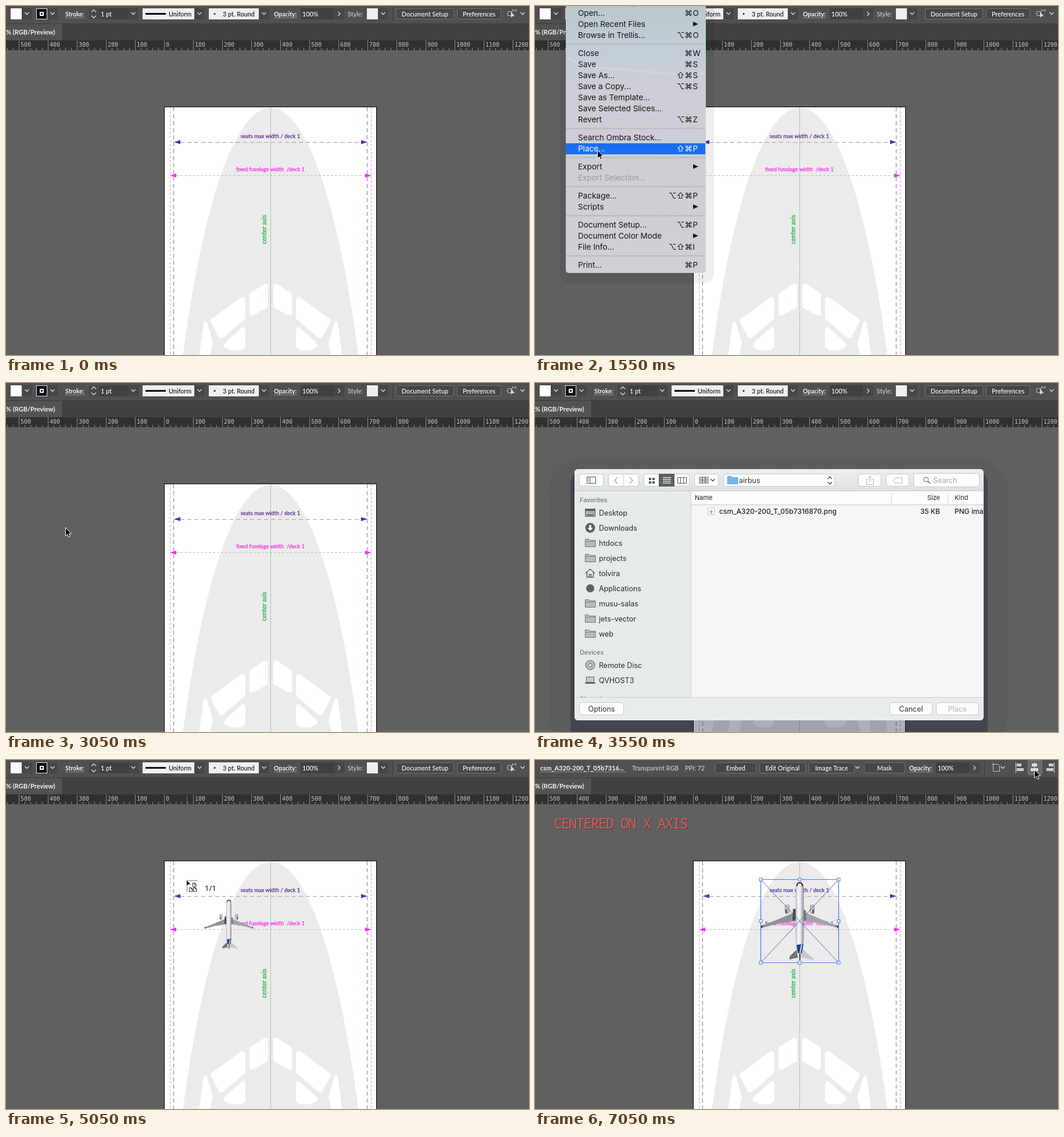
Animation of 900x600 px, one loop 8 s. Source, as an HTML page:

```html
<!DOCTYPE html>
<html lang="en">
<head>
<meta charset="utf-8">
<title>Placing and centering an image</title>
<style>
html, body { margin: 0; width: 100%; height: 100%; overflow: hidden; background: #606060; }
svg { display: block; width: 900px; height: 600px; }
text { white-space: pre; }
.ui { font: 500 10.8px Lato, sans-serif; }
.note { font: 9.4px Lato, sans-serif; text-anchor: middle; stroke-width: .25px; }
.ruler { font: 10px "DejaVu Sans Mono", monospace; fill: #c4c4c4; }
.menu { font: 13.5px Inter, "DejaVu Sans", sans-serif; }
.mac { font: 12.5px Inter, sans-serif; }
.head { font: 500 10.8px Inter, sans-serif; fill: #747678; }
.col { font: 11px Inter, sans-serif; }
.file { font: 500 12px Inter, sans-serif; }
.title { font: 24.5px "Noto Sans Mono", monospace; letter-spacing: -1.95px; fill: #d65b5b; filter: drop-shadow(1px 1px 0 #443c3c); }
</style>
</head>
<body>
<svg id="stage" viewBox="0 0 900 600"></svg>
<script>
const LOOP = 8000;

// ---------- drawing helpers ----------
const rect = (x, y, w, h, fill, extra = '') =>
  `<rect x="${x}" y="${y}" width="${w}" height="${h}" fill="${fill}" ${extra}/>`;
const text = (x, y, str, cls, fill = '', extra = '') =>
  `<text x="${x}" y="${y}" class="${cls}" ${fill && `fill="${fill}"`} ${extra}>${str}</text>`;
const line = (x1, y1, x2, y2, stroke, extra = '') =>
  `<line x1="${x1}" y1="${y1}" x2="${x2}" y2="${y2}" stroke="${stroke}" ${extra}/>`;
const shape = (d, fill, extra = '') => `<path d="${d}" fill="${fill}" ${extra}/>`;
const stroke = (d, color, extra = '') => shape(d, 'none', `stroke="${color}" ${extra}`);
const circle = (x, y, r, fill, extra = '') => `<circle cx="${x}" cy="${y}" r="${r}" fill="${fill}" ${extra}/>`;
const range = (n, fn) => Array.from({ length: n }, (_, i) => fn(i)).join('');
const dash = pattern => `stroke-dasharray="${pattern}"`;
const middle = 'text-anchor="middle"', end = 'text-anchor="end"';
const timed = (from, to, body) => `<g data-from="${from}" data-to="${to}">${body}</g>`;

const chevron = (x, y = 13, color = '#ddd') => stroke(`M${x - 3.5} ${y - 2}l3.5 3.5 3.5-3.5`, color, 'stroke-width="1.3"');
const dropdown = x => rect(x - 8, 4, 17, 19, '#464646') + chevron(x);
const underlined = (x, str, w, size = 10.4) =>
  text(x, 17.5, str, 'ui', '#f4f4f4', `style="font-weight:700;font-size:${size}px"`) +
  line(x, 20.5, x + w, 20.5, '#ccc', dash('1 1'));
const button = (x, w, label) =>
  rect(x + .5, 4.5, w - 1, 18, '#464646', 'rx="2.5" stroke="#707070"') +
  text(x + w / 2, 17.7, label, 'ui', '#fff', middle);
const opacityField = x => underlined(x, 'Opacity:', 40) + rect(x + 46, 4, 58, 19, '#404040') +
  text(x + 49, 17.5, '100%', 'ui', '#fff') + rect(x + 105, 4, 16, 19, '#464646') +
  stroke(`M${x + 110.5} 10l3.5 3.5-3.5 3.5`, '#ddd', 'stroke-width="1.3"');

// ---------- application frame ----------
const note = (x, y, str, color, extra = '') => text(x, y, str, 'note', color, `stroke="${color}" ${extra}`);

function artboard() {
  const panes = 'M422 496L445 481H448V516L425 529H422Z M355 541L407 503L409 505V536L373 567L369 568Z' +
    ' M343 545L353 580L347 604H335Z M378 584L381 579L408 555L409 558V585L404 589H387Z';
  const cockpit = shape(panes, '#fff', 'stroke="#fff" stroke-width="6" stroke-linejoin="round"');
  const arrows = (y, l, r, color) =>
    shape(`M${l} ${y}l11-3.5v7zM${r} ${y}l-11-3.5v7z`, color);
  return rect(272.5, 173.5, 365, 440, '#fff', 'stroke="#000"') +
    '<ellipse cx="455.5" cy="1228" rx="188" ry="1053" fill="#ebebeb"/>' +
    cockpit + `<g transform="matrix(-1 0 0 1 911 0)">${cockpit}</g>` +
    line(455.5, 175, 455.5, 600, '#86bf8c', dash('2 1')) +
    line(282.5, 174, 282.5, 600, '#dda898', dash('4 3')) +
    line(288.5, 174, 288.5, 600, '#9468bb', dash('7 5')) +
    line(621.5, 174, 621.5, 600, '#9468bb', dash('7 5')) +
    line(628.5, 174, 628.5, 600, '#f78af0', dash('4 3')) +
    line(300, 234.5, 611, 234.5, '#a596ba', dash('7 5')) + arrows(234, 289, 622, '#5c2d91') +
    line(293, 291.5, 618, 291.5, '#bebebe', dash('4 3')) + arrows(291.5, 282, 629, '#ff2ef0') +
    note(455, 227, 'seats max width / deck 1', '#5c2d91') +
    note(455, 284, 'fixed fuselage width  /deck 1', '#f52be8') +
    note(0, 0, 'center axis', '#1fae3f', 'transform="translate(448 384) rotate(-90)" style="font-size:10.7px"');
}

function chrome() {
  return rect(0, 0, 900, 30, '#505050') + rect(0, 30, 900, 29, '#424242') +
    rect(0, 31, 97, 28, '#525252') + line(97.5, 31, 97.5, 59, '#383838') + line(0, 30.5, 900, 30.5, '#3b3b3b') +
    text(0, 48.5, '% (RGB/Preview)', 'ui', '#f2f2f2', 'style="font-weight:700;font-size:11px"') +
    rect(0, 59, 900, 17, '#303030') +
    range(91, i => line(2.5 + i * 10, 72, 2.5 + i * 10, 76, '#8c8c8c')) +
    range(18, i => line(22.5 + i * 50, 59, 22.5 + i * 50, 76, '#8c8c8c') +
      text(25 + i * 50, 70, Math.abs(i - 5) * 100, 'ruler'));
}

const pathBar = () =>
  rect(8, 4, 19, 19, '#fff') + dropdown(36) +
  rect(52.5, 4.5, 18, 18, '#0b0c18', 'stroke="#ddd"') + rect(58, 10, 7, 7, '#fff') + rect(60, 12, 3, 3, '#0b0c18') + dropdown(80) +
  underlined(102, 'Stroke:', 33) + rect(143, 4, 16, 19, '#464646') +
  stroke('M147 10.5l4-4 4 4M147 16.5l4 4 4-4', '#ddd', 'stroke-width="1.3"') +
  rect(160, 4, 51, 19, '#404040') + text(163, 17.5, '1 pt', 'ui', '#fff') + dropdown(219) +
  rect(235, 4, 89, 19, '#efefef') + rect(240, 12, 35, 3, '#0b0c18') + text(280, 17.7, 'Uniform', 'ui', '#111') + dropdown(333) +
  rect(349, 4, 86, 19, '#efefef') + circle(359, 13.5, 1.5, '#222') + text(373, 17.7, '3 pt. Round', 'ui', '#111') + dropdown(444) +
  opacityField(461) + text(588, 17.7, 'Style:', 'ui', '#d0d0d0') + rect(621, 4, 19, 19, '#efefef') + dropdown(649) +
  line(665.5, 2, 665.5, 26, '#3c3c3c') + button(671, 100, 'Document Setup') + button(776, 76, 'Preferences') +
  stroke('M863.5 9.5h7v7h-7zM862 13.5h-1M871 7.5h6M877.5 5v5M872 5.5v4', '#bbb') +
  shape('M869 10v10l2.5-2.5h4z', '#ddd') + chevron(889);

const imageBar = () =>
  underlined(9, 'csm_A320-200_T_05b7316...', 148, 11) + text(167, 17.5, 'Transparent RGB', 'ui', '#cfcfcf') +
  text(258, 17.5, 'PPI: 72', 'ui', '#cfcfcf') + button(310, 71, 'Embed') + button(386, 80, 'Edit Original') +
  button(471, 79, 'Image Trace') + chevron(555) + button(566, 71, 'Mask') + opacityField(644) +
  line(773.5, 2, 773.5, 26, '#3c3c3c') +
  stroke('M788.5 7.5h8l3 3v9h-11zM786 7.5h2M788.5 5v2', '#ccc') + chevron(805) +
  rect(848.5, .5, 24, 25, '#6a6a6a', 'rx="2" stroke="#7a7a7a"') +
  line(827.5, 4, 827.5, 22, '#ddd') + rect(829, 6, 8, 5, '#ccc') + rect(829, 14, 12, 5, '#ccc') +
  line(859.5, 4, 859.5, 22, '#ddd') + rect(855, 6, 9, 5, '#ddd') + rect(853, 14, 13, 5, '#ddd') +
  line(893.5, 4, 893.5, 22, '#ddd') + rect(884, 6, 8, 5, '#ccc') + rect(880, 14, 12, 5, '#ccc');

// ---------- file menu ----------
// '>' marks a submenu, '-' a separator
const MENU = `New from Template...|⇧⌘N
Open...|⌘O
Open Recent Files|>
Browse in Trellis...|⌥⌘O
-
Close|⌘W
Save|⌘S
Save As...|⇧⌘S
Save a Copy...|⌥⌘S
Save as Template...
Save Selected Slices...
Revert|⌥⌘Z
-
Search Ombra Stock...
Place...|⇧⌘P
-
Export|>
Export Selection...
-
Package...|⌥⇧⌘P
Scripts|>
-
Document Setup...|⌥⌘P
Document Color Mode|>
File Info...|⌥⇧⌘I
-
Print...|⌘P`.split('\n');

function menuRow(label, keys, y, color) {
  let row = text(74, y + 5, label, 'menu', color);
  if (keys === '>') row += shape(`M272 ${y - 4}l9 4-9 4z`, color);
  else if (keys) row += text(271, y + 5, keys.slice(0, -1), 'menu', color, end) + text(271.5, y + 5, keys.slice(-1), 'menu', color);
  return row;
}

function fileMenu() {
  let y = -7, rows = '';
  for (const item of MENU) {
    if (item === '-') {
      rows += rect(53, y - 4.5, 240, 2, '#b9b9bf');
      y += 12;
      continue;
    }
    const [label, keys] = item.split('|');
    rows += menuRow(label, keys, y, label.startsWith('Export S') ? '#98989d' : '#141416');
    if (label === 'Place...')
      rows += timed(1550, 3050, rect(53, y - 9, 240, 19, '#1a6ff0') + menuRow(label, keys, y, '#fff'));
    y += 19;
  }
  return rect(42, -20, 266, 496, '#140a38', 'rx="16" opacity=".07"') +
    `<g id="menu">${rect(53, -10, 241, 469, 'url(#menuFill)', 'rx="5"')}
    ${stroke('M56 90Q90 106 130 108T200 114T290 116', '#d5dccb', 'stroke-width="4" opacity=".6"')}${rows}</g>`;
}

// ---------- file dialog ----------
const box = (x, y, w, h) => rect(x + .5, y + .5, w - 1, h - 1, '#fcfcfc', 'rx="4" stroke="#c6c8c9"');
const folder = (x, y, fill, edge) => shape(`M${x} ${y - 6.5}h6l2 2h9.5v11h-17.5z`, fill, `stroke="${edge}"`);
const GREY = '#5f6264';

const ICONS = {
  folder: y => folder(86.5, y, '#b9bcbe', '#707375') + line(87, y - 2.5, 104, y - 2.5, '#808385'),
  desktop: y => rect(86.5, y - 6.5, 17, 13, '#a9acae', `stroke="${GREY}"`) + rect(87, y - 6, 16, 3, GREY) + rect(89, y + 3, 12, 2, GREY),
  down: y => circle(95, y, 8.5, GREY) + shape(`M93.5 ${y - 5}h3v5h3l-4.5 5-4.5-5h3z`, '#fff'),
  home: y => stroke(`M87 ${y}l8-7 8 7M89.5 ${y - 1}v8h11v-8M93.5 ${y + 7}v-5h3v5`, GREY, 'stroke-width="1.6"'),
  dot: y => circle(95, y, 7, GREY),
  disc: y => circle(95, y, 8, '#b9bcbe', `stroke="${GREY}"`) + circle(95, y, 3, '#e6e9ea', `stroke="${GREY}"`),
  laptop: y => rect(88.5, y - 5.5, 13, 9, '#c9cccd', `stroke="${GREY}"`) + rect(86, y + 4, 18, 2, GREY),
};
const SIDEBAR = [['Desktop', 'desktop'], ['Downloads', 'down'], ['htdocs', 'folder'], ['projects', 'folder'],
  ['tolvira', 'home'], ['Applications', 'dot'], ['musu-salas', 'folder'], ['jets-vector', 'folder'], ['web', 'folder']];
const DEVICES = [['Remote Disc', 'disc'], ['QVHOST3', 'laptop']];
const places = (list, top) => list.map(([label, icon], i) =>
  ICONS[icon](top + i * 26) + text(110, top + 4.5 + i * 26, label, 'mac', '#2a2a2a')).join('');

const fileRow = color => text(317, 225, 'csm_A320-200_T_05b7316870.png', 'file', color) +
  text(697, 225, '35 KB', 'file', color, end) + text(722, 225, 'PNG image', 'file', color) +
  rect(297.5, 214.5, 11, 12, '#fff', 'stroke="#c4c4c4"') + shape('M303 216l1 4 3 2h-3v3h-2v-3h-3l3-2z', '#aaa');

const dialogActions = color =>
  stroke('M573.5 165.5h-3v9h12v-9h-3M576.5 170v-10M573.5 163l3-3 3 3', color) +
  stroke('M616 167.5l4-4.5h12v9h-12z', color) + text(727, 565, 'Place', 'mac', color, middle);

function dialog() {
  return rect(24, 128, 790, 500, '#000', 'rx="60" opacity=".04"') +
    rect(61, 150, 718, 480, '#0c1330', 'rx="22" opacity=".3"') +
    `<g clip-path="url(#window)">` +
    rect(68, 148, 704, 432, '#e7eaeb') + rect(68, 148, 704, 38, 'url(#toolbar)') +
    rect(269, 186, 503, 355, '#f6f6f6') + rect(269, 186, 503, 23, '#fdfdfd') +
    line(68, 185.5, 772, 185.5, '#c6c9ca') + line(268.5, 186, 268.5, 541, '#cdd0d1') +
    line(269, 209.5, 772, 209.5, '#c9c9c9') + line(613.5, 189, 613.5, 207, '#d5d5d5') + line(710.5, 189, 710.5, 207, '#d5d5d5') +
    text(275, 201, 'Name', 'col', '#222') + text(697, 201, 'Size', 'col', '#222', end) + text(722, 201, 'Kind', 'col', '#222') +
    box(76, 156, 42, 22) + stroke('M89.5 161.5h15v11h-15zM94.5 162v10M91 164.5h2M91 167.5h2', '#555') +
    box(126, 156, 53, 22) + line(152.5, 157, 152.5, 177, '#d0d0d0') + stroke('M142 162l-5 5.5 5 5.5M163 162l5 5.5-5 5.5', '#aaa', 'stroke-width="1.4"') +
    box(187, 156, 79, 22) + rect(213, 156, 27, 22, '#5c5e60') +
    range(4, i => rect(196 + i % 2 * 6, 163 + (i >> 1) * 6, 4, 4, '#555')) +
    range(4, i => rect(220, 162 + i * 3.2, 14, 1.2, '#fff')) +
    stroke('M245.5 162.5h15v10h-15zM250.5 162v10M255.5 162v10', '#555') +
    box(274, 156, 42, 22) + range(6, i => rect(283 + i % 3 * 5.5, 162 + (i / 3 | 0) * 6, 4, 4, 'none', 'stroke="#555"')) + chevron(306, 167, '#444') +
    box(324, 156, 192, 22) + folder(331.5, 167, '#6fb7ec', '#58a4dc') + text(351, 172, 'airbus', 'mac', '#333') +
    stroke('M504 165l3.5-4 3.5 4M504 170l3.5 4 3.5-4', '#444', 'stroke-width="1.3"') +
    box(556, 156, 40, 22) + box(604, 156, 40, 22) + box(651, 155, 114, 24) +
    circle(673, 166, 4, 'none', 'stroke="#666"') + line(676, 169, 680, 173, '#666', 'stroke-width="1.4"') + text(685, 172, 'Search', 'mac', '#a9a9a9') +
    text(77, 205, 'Favorites', 'head') + places(SIDEBAR, 223) + text(77, 467, 'Devices', 'head') + places(DEVICES, 485) +
    text(77, 547, 'Shared', 'head') + rect(68, 541, 704, 39, '#e9ecec') + line(68, 540.5, 772, 540.5, '#cacdce') +
    box(76, 549, 77, 22) + text(114.5, 565, 'Options', 'mac', '#333', middle) +
    box(610, 549, 74, 22) + text(647, 565, 'Cancel', 'mac', '#333', middle) + box(690, 549, 74, 22) +
    timed(3550, 4550, fileRow('#222') + dialogActions('#b5b5b5')) +
    timed(4550, 5050, rect(269, 211, 503, 18, '#0b6fe2') + fileRow('#fff') + dialogActions('#444')) + '</g>';
}

// ---------- placed image ----------
const wing = (fill, tip) => shape('M61 51L56 58L30 69L2 80L1 84L32 76L61 72Z', fill) + shape('M6 79L1 80V85Z', tip) +
  rect(42.5, 44.5, 7, 14, '#c3c5ca', 'rx="2" stroke="#8a8c91"') + shape('M43 52h3v7h-3z', '#5f6167');
const plane = () => wing('#909297', '#3b3c42') +
  `<g transform="matrix(-1 0 0 1 135 0)">${wing('#a2a4a9', '#4a4b52')}</g>` +
  shape('M56 51h5v20h-6z', '#4b4c51') + shape('M74 53h4l1 18h-5z', '#77797f') +
  shape('M62 121L50 133V138L67 134Z', '#717379') + shape('M73 121L91 136V139L68 134Z', '#c6c8cd') +
  shape('M60.5 18Q61 4 67.5 4T74.500 18V100Q74 125 69 139H66Q61 125 60.5 100Z', 'url(#hull)') +
  stroke('M62.5 12Q63 6 67.5 6T72.5 12', '#26262b', 'stroke-width="2"') +
  shape('M62 113L74 111L71 127H64Z', '#1f4380') + shape('M70 112h2l-3 15h-2z', '#dfe6f2') + shape('M66.5 127h2.5v12h-2.5z', '#54565c');

const selection = x => `<g transform="translate(${x} 205)">${plane()}` +
  stroke('M.5.5L134.5 143.5M134.5.5L.5 143.5', '#3d5fae', 'stroke-width=".9"') +
  stroke('M.5.5h134v143h-134z', '#3f7bff', 'stroke-width="1.2"') +
  range(9, i => i === 4 ? '' : rect(i % 3 * 67 - 2, (i / 3 | 0) * 71.5 - 2, 5, 5, '#fff', 'stroke="#3f7bff"')) + '</g>';

const placeCursor = () =>
  line(311.5, 60, 311.5, 76, '#aaa', dash('1 1')) +
  `<g transform="translate(341 237) scale(.63)">${plane()}</g>` +
  stroke('M311.5 226v-18.5h18', '#000', dash('1 1')) + shape('M311 207v9l2.5-2.5h4z', '#000') +
  [[321, 211], [315, 219], [322, 219]].map(([x, y]) => stroke(`M${x + .5} ${y + .5}h3l2.5 2.5v4h-5.5zM${x + 3.5} ${y}v3h3`, '#111', 'stroke-width=".9"')).join('') +
  text(342, 225, '1/1', 'menu', '#111', 'style="font:13px Noto Sans,sans-serif"');

// ---------- scene ----------
const stops = (...list) => list.map(([at, color]) => `<stop offset="${at}" stop-color="${color}"/>`).join('');
const stage = document.getElementById('stage');
stage.innerHTML = `<defs>
  <linearGradient id="menuFill" x2="0" y2="1">${stops([0, '#b9c6c9'], [.2, '#c3ced8'], [.29, '#cccdd5'], [1, '#d0cfd4'])}</linearGradient>
  <linearGradient id="toolbar" x2="0" y2="1">${stops([0, '#eceff0'], [1, '#dde1e2'])}</linearGradient>
  <linearGradient id="hull">${stops([0, '#b4b5bd'], [.3, '#f6f6f9'], [.6, '#e6e6ec'], [1, '#8c8d96'])}</linearGradient>
  <clipPath id="window"><rect x="68" y="148" width="704" height="432" rx="6"/></clipPath></defs>` +
  rect(0, 0, 900, 600, '#606060') + artboard() + chrome() +
  timed(0, 6050, pathBar()) + timed(6050, LOOP, imageBar()) +
  timed(1050, 3050, fileMenu()) + timed(3550, 5050, dialog()) + timed(5050, 6050, placeCursor()) +
  timed(6050, 7050, selection(311)) +
  timed(7050, LOOP, selection(388) + text(32.5, 118, 'CENTERED ON X AXIS', 'title')) +
  `<path id="cursor" d="M.5.5V15L3.8 12L6 17L8.3 16L6.2 11H10.5Z" fill="#000" stroke="#fff"/>`;

const menu = document.getElementById('menu');
const cursor = document.getElementById('cursor');
const timedParts = [...stage.querySelectorAll('[data-from]')];
// [from, to, x, y]
const CURSOR = [[1550, 3050, 107, 247], [3050, 3550, 102, 248], [4550, 5050, 477, 214],
  [6050, 7050, 864, 16], [7050, LOOP, 859, 16]];

function render(t) {
  for (const part of timedParts)
    part.style.display = t >= +part.dataset.from && t < +part.dataset.to ? '' : 'none';
  menu.setAttribute('opacity', t < 2550 ? 1 : .56);
  const spot = CURSOR.find(([from, to]) => t >= from && t < to);
  cursor.style.display = spot ? '' : 'none';
  if (spot) cursor.setAttribute('transform', `translate(${spot[2]} ${spot[3]})`);
}

const start = performance.now();
function tick() {
  render((performance.now() - start) % LOOP);
  requestAnimationFrame(tick);
}
tick();
</script>
</body>
</html>
```
